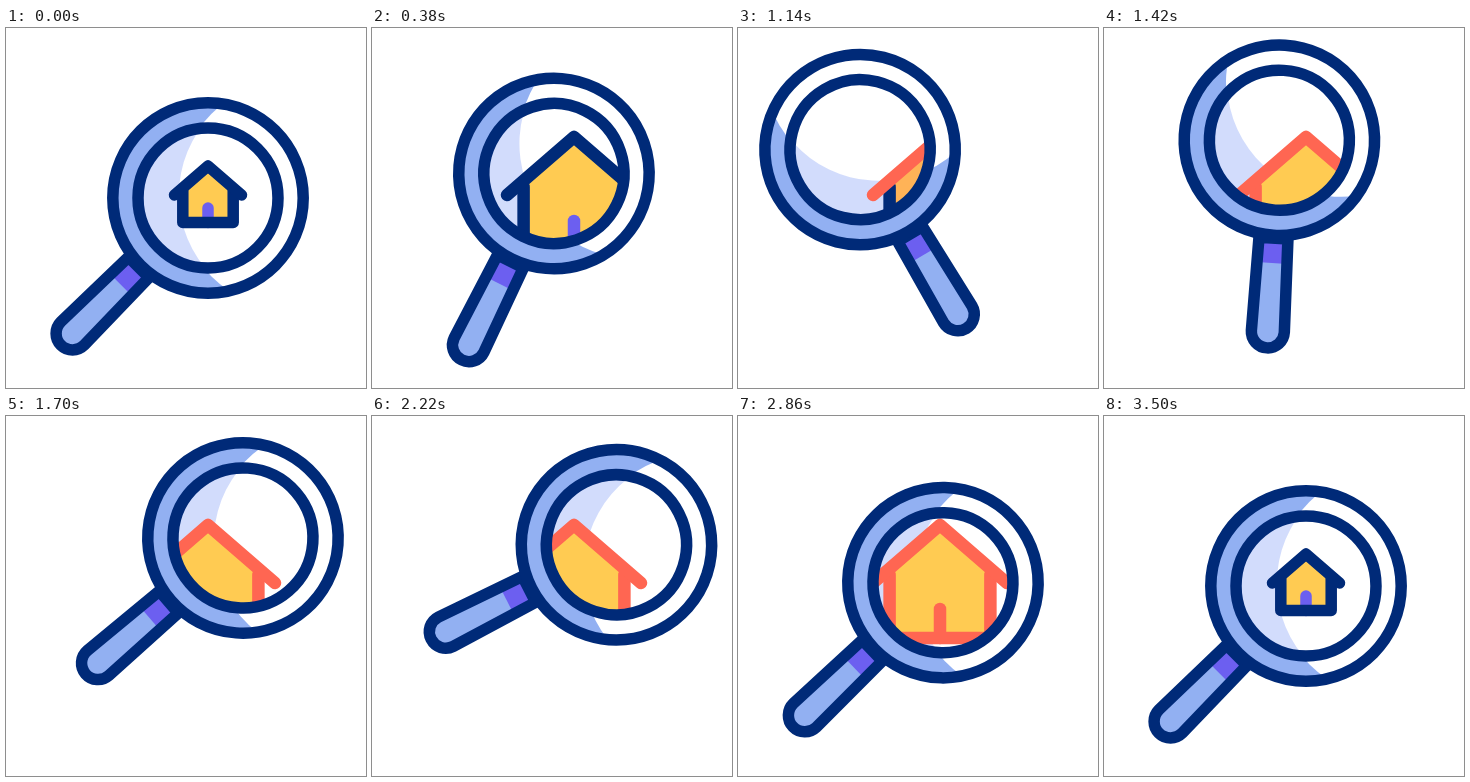
An HTML page that plays this animation: 360x360 px, repeating every 3600 ms.

```html
<!DOCTYPE html>
<html lang="en">
<head>
<meta charset="utf-8">
<title>House search</title>
<style>
  html, body { margin: 0; width: 100%; height: 100%; overflow: hidden; background: #fff; }
  svg { display: block; width: 100vw; height: 100vh; }
  .line { fill: none; stroke: #002a78; stroke-width: 11.5; }
  .round { fill: none; stroke-linecap: round; stroke-linejoin: round; }
</style>
</head>
<body>
<svg viewBox="0 0 360 360">
  <defs>
    <clipPath id="disc"><circle r="95"/></clipPath>
    <clipPath id="glass"><circle r="70"/></clipPath>
    <clipPath id="view"><circle id="hole" r="68"/></clipPath>
  </defs>
  <g class="pose">
    <path d="M98-14.5 191.5-16.5A16.5 16.5 0 0 1 191.5 16.5L98 14.5Z" fill="#92b0f2"/>
    <path d="M96-14.5 123-15V15L96 14.5Z" fill="#6c5ff0"/>
    <path class="line" d="M98-14.5 191.5-16.5A16.5 16.5 0 0 1 191.5 16.5L98 14.5Z"/>
    <g clip-path="url(#disc)">
      <circle r="95" fill="#92b0f2"/>
      <circle cx="-62" cy="-58" r="115" fill="#fff"/>
    </g>
    <g clip-path="url(#glass)">
      <circle r="70" fill="#d2dcfc"/>
      <circle cx="-62" cy="-58" r="114" fill="#fff"/>
    </g>
  </g>
  <g clip-path="url(#view)">
    <g id="house" class="round" transform="translate(202 167)">
      <path id="fill"/>
      <path id="door"/>
      <path id="walls"/>
      <path id="roof"/>
    </g>
  </g>
  <g class="pose">
    <circle class="line" r="95.2"/>
    <circle class="line" r="70"/>
  </g>
</svg>
<script>
const LOOP = 3600;
const NAVY = [0, 42, 120], CORAL = [255, 102, 82], YELLOW = [255, 203, 82],
      ORANGE = [255, 179, 87], PURPLE = [108, 95, 240];

const REST = { x: 202, y: 170, a: 135 };
const LEFT = { x: 118, y: 123, a: 56.8 };
const RIGHT = { x: 248, y: 126, a: 156 };

// Times of travel and of turn, the two poses, height of the arc's control point
const moves = [
  { go: [160, 840], turn: [160, 840], from: REST, to: LEFT, bend: 110 },
  { go: [1050, 1852], turn: [1050, 1942], from: LEFT, to: RIGHT, bend: 100 },
  { go: [2047, 3020], turn: [1960, 3020], from: RIGHT, to: REST, bend: 144 }
];

const $ = id => document.getElementById(id);
const poses = document.querySelectorAll('.pose');
const set = (el, attrs) => { for (const k in attrs) el.setAttribute(k, attrs[k]); };
const mix = (a, b, p) => a + (b - a) * p;
const blend = (a, b, p) => `rgb(${a.map((v, i) => Math.round(mix(v, b[i], p)))})`;
const ramp = (t, a, b) => {
  const u = Math.min(1, Math.max(0, (t - a) / (b - a)));
  return (1 - Math.cos(Math.PI * u)) / 2;
};
const path = (s, ...pts) => 'M' + pts.map(v => (v * s).toFixed(2)).join(' ');

function poseAt(t) {
  const current = key => moves.filter(m => m[key][0] <= t).pop() || moves[0];
  const m = current('go'), r = current('turn');
  const p = ramp(t, ...m.go), q = 1 - p;
  return {
    x: mix(m.from.x, m.to.x, p),
    y: q * q * m.from.y + 2 * p * q * m.bend + p * p * m.to.y,
    a: mix(r.from.a, r.to.a, ramp(t, ...r.turn))
  };
}

function draw(t) {
  const { x, y, a } = poseAt(t);
  poses.forEach(g => set(g, { transform: `translate(${x} ${y}) rotate(${a})` }));
  set($('hole'), { cx: x, cy: y });

  const back = ramp(t, 3320, 3500);
  const s = 1 + ramp(t, 160, 340) - back;
  const roof = ramp(t, 1040, 1130) - back;
  const walls = ramp(t, 1150, 1240) - back;
  const flash = ramp(t, 1040, 1130) - ramp(t, 1150, 1240);

  set($('house'), { 'stroke-width': 10.5 + s });
  set($('fill'), {
    d: path(s, -25.2, 27.5, -25.2, -7, 0, -29, 25.2, -7, 25.2, 27.5) + 'Z',
    fill: blend(YELLOW, ORANGE, flash)
  });
  set($('door'), { d: path(s, 0, 13, 0, 27.5), stroke: blend(PURPLE, CORAL, walls) });
  set($('walls'), {
    d: path(s, -25.2, -4, -25.2, 27.5, 25.2, 27.5, 25.2, -4),
    stroke: blend(NAVY, CORAL, walls)
  });
  set($('roof'), { d: path(s, -33.5, 0, 0, -29, 33.5, 0), stroke: blend(NAVY, CORAL, roof) });
}

const start = performance.now();
function tick() {
  draw((performance.now() - start) % LOOP);
  requestAnimationFrame(tick);
}
tick();
</script>
</body>
</html>
```
